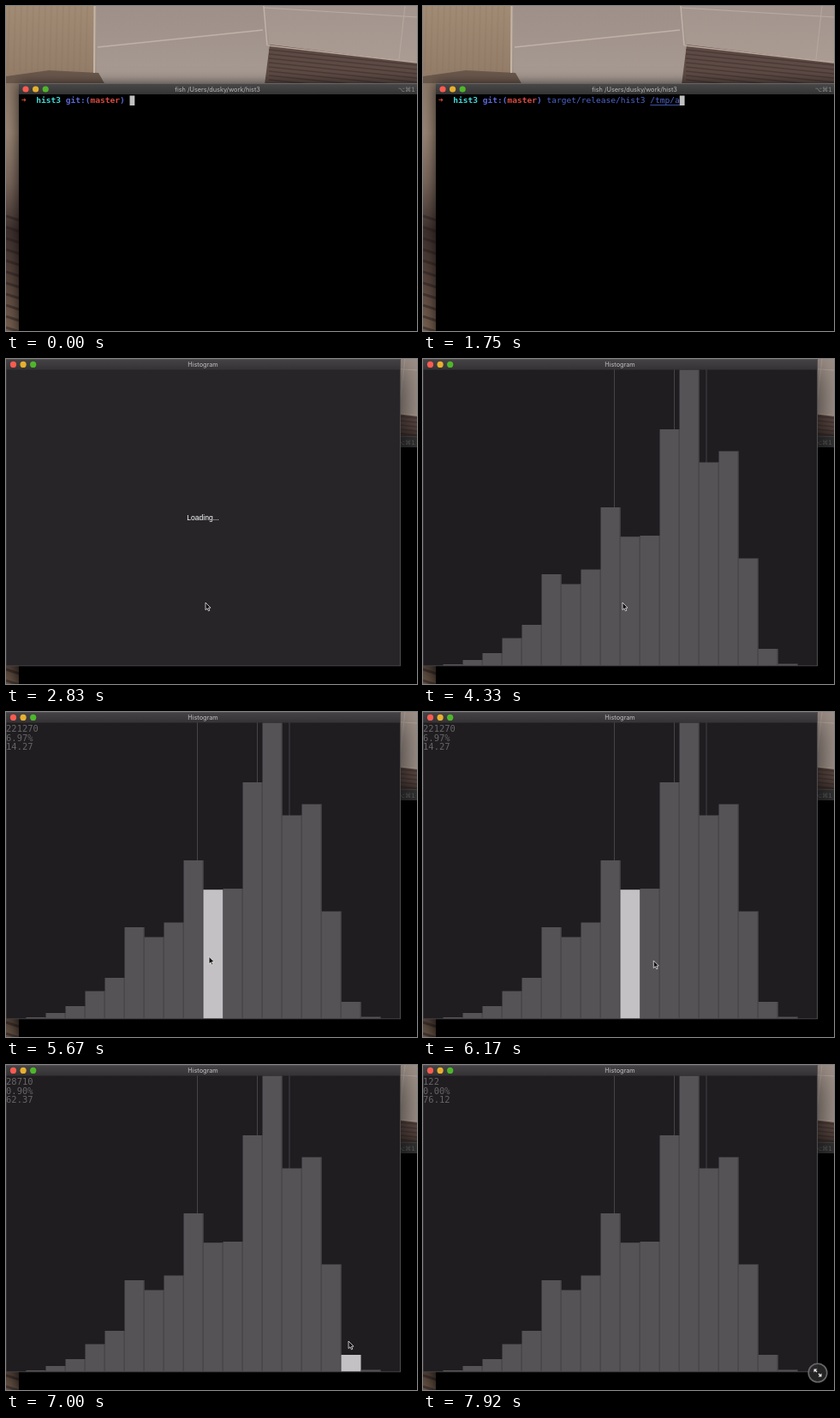
Write an HTML page with a canvas that moves like this. It is 480x379 px and loops after 8000 ms.

```html
<!DOCTYPE html>
<html lang="en">
<head>
<meta charset="utf-8">
<title>Histogram</title>
<style>
html, body { margin: 0; width: 100%; height: 100%; overflow: hidden; background: #000; }
canvas { display: block; width: 480px; height: 379px; }
</style>
</head>
<body>
<canvas id="stage"></canvas>
<script>
const W = 480, H = 379, LOOP = 8000, TICK = 1000 / 12;
const canvas = document.getElementById('stage');
const dpr = window.devicePixelRatio || 1;
canvas.width = W * dpr;
canvas.height = H * dpr;
const c = canvas.getContext('2d');

const UI = 'Inter, "Liberation Sans", sans-serif';
const MONO = '"DejaVu Sans Mono", monospace';
const COL = 5.75;
const COMMAND = 'target/release/hist3 /tmp/a';

const counts = [0, 2208, 9570, 21350, 47110, 69930, 156800, 139870, 164890, 271630,
  221270, 223050, 405610, 507930, 348930, 368067, 184030, 28710, 2950, 122];
const total = counts.reduce((a, b) => a + b);
const BIN = 23, BASE = 357.5, PER_PX = 1472.27;

// time, x, y of the pointer tip
const path = [[0, 233, 284], [4660, 233, 284], [4750, 235, 285], [5580, 235, 285],
  [5920, 243, 286], [6085, 252, 288], [6170, 270, 290], [6250, 312, 296], [6330, 350, 301],
  [6420, 366, 303], [6500, 368.3, 303], [6580, 370, 304], [6670, 370, 304],
  [7000, 400, 322], [7330, 447, 350], [7500, 461, 359], [8000, 461, 359]];

function pointer(t) {
  const i = Math.max(1, path.findIndex(p => p[0] >= t));
  const [a, b] = [path[i - 1], path[i]];
  const k = (t - a[0]) / (b[0] - a[0]);
  return [a[1] + (b[1] - a[1]) * k, a[2] + (b[2] - a[2]) * k];
}

function rect(x, y, w, h, fill) {
  c.fillStyle = fill;
  c.fillRect(x, y, w, h);
}

function poly(points, fill) {
  c.beginPath();
  points.forEach(p => c.lineTo(...p));
  c.closePath();
  c.fillStyle = fill;
  c.fill();
}

function line(x1, y1, x2, y2, color, width = 1) {
  c.beginPath();
  c.moveTo(x1, y1);
  c.lineTo(x2, y2);
  c.strokeStyle = color;
  c.lineWidth = width;
  c.stroke();
}

function text(s, x, y, font, fill, align = 'left') {
  c.font = font;
  c.textAlign = align;
  c.fillStyle = fill;
  c.fillText(s, x, y);
}

function gradient(y0, y1, ...colors) {
  const g = c.createLinearGradient(0, y0, 0, y1);
  colors.forEach((color, i) => g.addColorStop(i / (colors.length - 1), color));
  return g;
}

function lights(x, y) {
  ['#fb5b50', '#e6b02f', '#4fb62b'].forEach((color, i) => {
    c.beginPath();
    c.arc(x + i * 11.6, y, 3.6, 0, 7);
    c.fillStyle = color;
    c.fill();
  });
}

function fields() {
  rect(0, 0, W, H, '#a1948c');
  rect(0, 0, 103, 92, gradient(0, 92, '#a18b75', '#917a66'));
  for (let x = 4; x < 100; x += 7) line(x, 0, x - 2, 76, '#7d685522', 2);
  poly([[106, 0], [300, 0], [305, 45], [308, 92], [106, 92]], gradient(0, 92, '#9e9089', '#a89b93'));
  poly([[302, 0], [480, 0], [480, 66], [308, 46]], gradient(0, 66, '#a3958d', '#aa9c93'));
  poly([[308, 45], [480, 66], [480, 92], [302, 92]], '#5d4a44');
  for (let y = 51; y < 100; y += 5) line(307, y, 480, y + 18, '#3f302d99', 1.5);
  poly([[0, 82], [50, 75], [108, 78], [116, 92], [0, 92]], '#6b584c');
  line(103.5, 0, 103, 78, '#c6b5a4', 2);
  line(107, 48, 300, 28, '#c0b2a8', 1.5);
  line(301, 0, 305, 46, '#c1b3a8', 1.5);
  line(305, 46, 480, 66, '#b8a79a', 1.5);
  line(302, 2, 480, 13, '#b9aca4', 1);
  line(466, 0, 459, 62, '#b6a8a0', 1);
  rect(0, 90, 16, H, gradient(90, H, '#8a7767', '#978373', '#77655a', '#3d302d', '#55433b', '#76604f'));
  for (let y = 245; y < H; y += 13) line(0, y, 16, y + 5, '#2b201f88', 3);
}

function terminal(t, focused) {
  c.save();
  c.shadowColor = '#000b';
  c.shadowBlur = 14 * dpr;
  rect(15, 91, 480, 300, '#000');
  c.restore();
  rect(15, 90, 480, 13, focused ? gradient(90, 103, '#4a494a', '#353435') : '#353435');
  line(15, 90.5, W, 90.5, focused ? '#666566' : '#484748');
  if (focused) lights(23, 97);
  text('fish /Users/dusky/work/hist3', 247, 99.6, '7.3px ' + UI, '#b8b7b8', 'center');
  text('⌥⌘1', 478, 99.6, '7.3px "DejaVu Sans", sans-serif', focused ? '#888788' : '#656465', 'right');

  const at = col => 18 + col * COL;
  const bold = 'bold 9.55px ' + MONO;
  [[0, '➜', '#e2483c'], [3, 'hist3', '#45d8d8'], [9, 'git:(', '#5b69d6'],
    [14, 'master', '#dc4a41'], [20, ')', '#5b69d6']]
    .forEach(([col, s, color]) => text(s, at(col), 113, bold, color));

  const step = from => Math.floor((t - from) / TICK + 0.1) + 1;
  let typed = 0;
  if (t >= 80) typed = Math.min(20, step(80) * 2);
  if (t >= 915) typed = 20 + Math.min(2, step(915));
  if (t >= 1580) typed = Math.min(COMMAND.length, 22 + step(1580) * 2);
  text(COMMAND.slice(0, typed), at(22), 113, '9.55px ' + MONO, '#4f66cc');
  if (typed > 21) line(at(43), 115.5, at(22 + typed), 115.5, '#4f66cc', 0.8);

  if (t < 1995) rect(at(22 + typed), 104.5, 5.8, 11.5, '#c0c0c0');
  else rect(at(0), 116.5, 5.8, 11.5, '#c0c0c0');
}

function histogram(bin) {
  rect(0, 12, 460, 346, '#1f1d20');
  for (const x of [223.5, 293.5, 331]) line(x, 12, x, BASE, '#454346');
  counts.forEach((n, i) => {
    const h = n / PER_PX, x = i * BIN + 0.5;
    if (h < 0.5) return;
    rect(x, BASE - h, BIN, h, i === bin ? '#c3c1c4' : '#555356');
    if (i !== bin) line(x + BIN - 0.5, BASE - h, x + BIN - 0.5, BASE, '#444245');
  });
  if (bin < 0) return;
  [counts[bin], (100 * counts[bin] / total).toFixed(2) + '%', (14.27 + (bin - 10) * 6.872).toFixed(2)]
    .forEach((s, i) => text(s, 0, 23.3 + i * 10.4, '10.5px ' + MONO, '#666467'));
}

function plotWindow(t) {
  const open = Math.min(1, (t - 2495) / 250);
  const scale = 0.85 + 0.15 * open;
  c.save();
  c.globalAlpha = open;
  c.translate(230, 179);
  c.scale(scale, scale);
  c.translate(-230, -179);
  c.save();
  c.shadowColor = '#000c';
  c.shadowBlur = 38 * dpr;
  c.shadowOffsetY = 9 * dpr;
  rect(0, 0, 460.5, 358, '#272528');
  c.restore();
  if (t >= 3745) {
    const [x] = pointer(t - TICK);
    histogram(t < 4745 ? -1 : Math.min(19, Math.floor(x / BIN)));
  } else if (t >= 2660) {
    text('Loading...', 230, 188.3, '8.6px "Liberation Sans", sans-serif', '#fff', 'center');
  }
  rect(0, 0, 460.5, 12.5, gradient(0, 12, '#454345', '#353335'));
  line(0, 0.3, 460, 0.3, '#626062', 0.6);
  lights(8.5, 6.4);
  text('Histogram', 230, 9.2, '7.3px ' + UI, '#c2c0c2', 'center');
  line(460.5, 2, 460.5, 358, '#4d4b4e');
  line(0, 357.8, 461, 357.8, '#4d4b4e', 0.8);
  line(0.3, 2, 0.3, 358, '#4d4b4e', 0.6);
  c.restore();
}

function arrow(x, y) {
  poly([[x, y], [x, y + 8.6], [x + 2, y + 6.8], [x + 3.4, y + 9.8],
    [x + 4.8, y + 9.2], [x + 3.5, y + 6.3], [x + 6, y + 6.1]], '#111');
  c.strokeStyle = '#e8e8e8';
  c.lineWidth = 0.8;
  c.stroke();
}

function resizer(x, y) {
  c.beginPath();
  c.arc(x, y, 10.8, 0, 7);
  c.fillStyle = '#2b292bdd';
  c.fill();
  c.strokeStyle = '#69676a';
  c.lineWidth = 1.6;
  c.stroke();
  for (const s of [-1, 1]) {
    line(x + s, y + s, x + s * 3.5, y + s * 3.5, '#eee', 1.2);
    poly([[x + s * 4.5, y + s * 4.5], [x + s * 4.5, y + s * 0.6], [x + s * 0.6, y + s * 4.5]], '#eee');
  }
}

function draw(t) {
  c.setTransform(dpr, 0, 0, dpr, 0, 0);
  const opened = t >= 2575;
  fields();
  terminal(t, !opened);
  if (!opened) return;
  plotWindow(t);
  const [x, y] = pointer(t);
  if (t >= 7495) resizer(x, y);
  else if (t >= 2740) arrow(x, y);
}

function loop(now) {
  // the picture advances twelve times a second
  const t = Math.floor((now % LOOP + 5) / TICK) * TICK;
  draw(Math.min(t, LOOP - TICK));
  requestAnimationFrame(loop);
}
requestAnimationFrame(loop);
</script>
</body>
</html>
```
